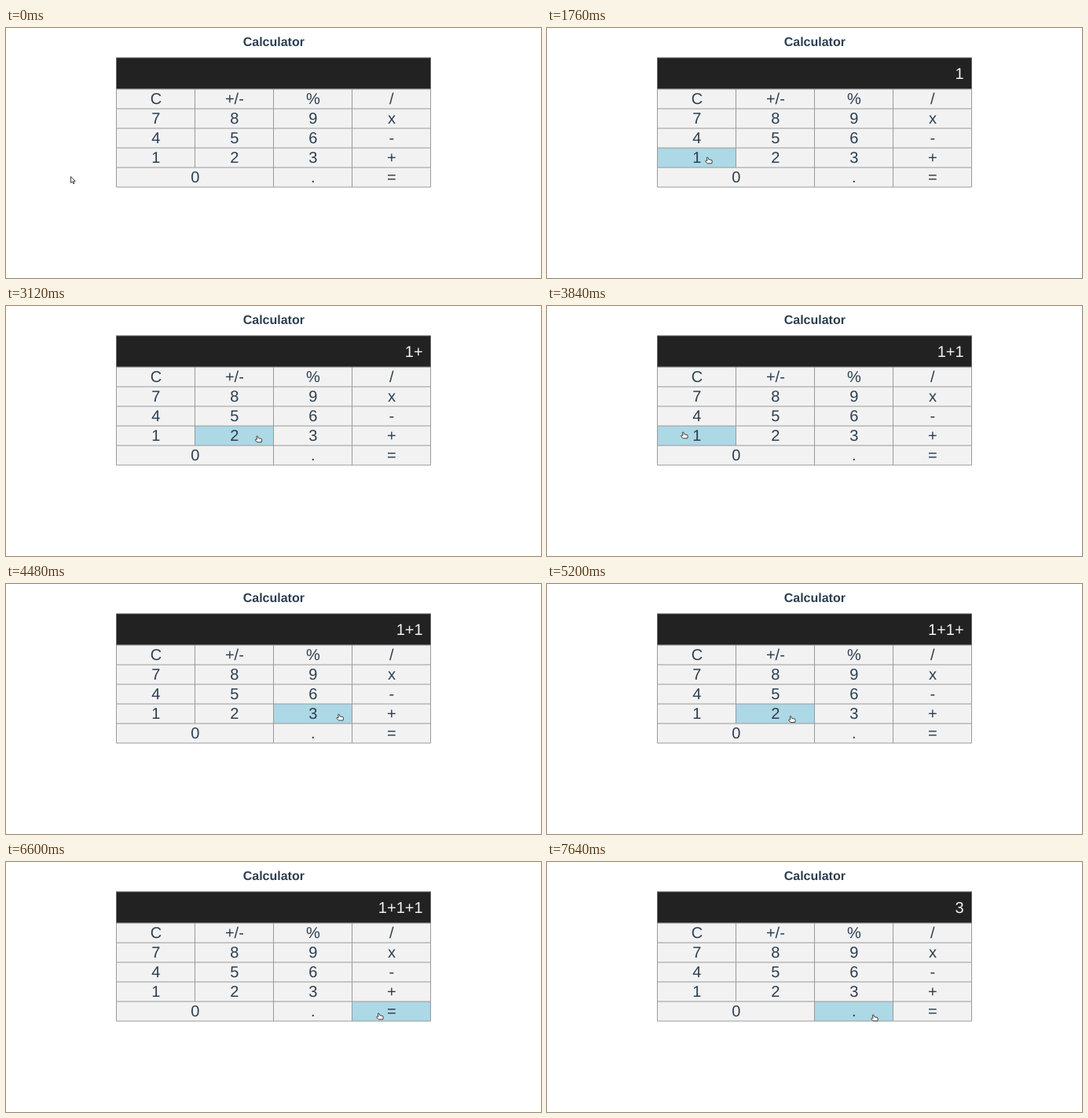
An HTML page for the animation above (8 s loop, 681 by 319 pixels).

```html
<!DOCTYPE html>
<html lang="en">
<head>
<meta charset="utf-8">
<title>Calculator</title>
<style>
html, body { margin: 0; width: 100%; height: 100%; overflow: hidden; background: #fff; }
svg { display: block; width: 681px; height: 319px; }
text { font: 20px "Liberation Sans", Arial, sans-serif; fill: #2c3e50; text-anchor: middle; text-rendering: geometricPrecision; }
.title { font-size: 16px; font-weight: bold; }
.screen { fill: #222; stroke: #666; }
.readout { fill: #f2f2f2; text-anchor: end; }
.cell { fill: #f2f2f2; }
.cell.hover { fill: #add8e6; }
.lines { fill: none; stroke: #999; }
.pointer { fill: #fff; stroke: #222; stroke-width: .85; stroke-linejoin: round; }
</style>
</head>
<body>
<svg viewBox="0 0 681 319">
  <text class="title" x="340.8" y="23">Calculator</text>
  <rect class="screen" x="140.5" y="38" width="400" height="40"/>
  <text class="readout" id="readout" x="530.6" y="65"></text>
  <g id="cells"></g>
  <path class="lines" d="M140.5 78h400v125h-400ZM140.5 103h400m-400 25h400m-400 25h400m-400 25h400M240.5 78v100M340.5 78v125M440.5 78v125"/>
  <g id="labels"></g>
  <path class="pointer" id="arrow" d="M.5.6V8.7L2.4 7 3.7 9.8 4.9 9.3 3.7 6.5H6.3Z"/>
  <path class="pointer" id="hand" d="M3 5.2 2.4 1.7Q2.6.5 3.7 1.1L4.9 3.8 8 4.3Q9.4 4.6 9.2 6L8.8 8.8H3.4L.9 6.6Q.3 5.4 1.4 5.2Z"/>
</svg>
<script>
const LOOP = 8000, STEP = 40;
const LEFT = 140.5, TOP = 78, COL = 100, ROW = 25;
const $ = id => document.getElementById(id);

function add(parent, tag, attrs, label = '') {
  const el = document.createElementNS('http://www.w3.org/2000/svg', tag);
  for (const name in attrs) el.setAttribute(name, attrs[name]);
  el.textContent = label;
  parent.append(el);
  return el;
}

const cells = [];
['C +/- % /', '7 8 9 x', '4 5 6 -', '1 2 3 +', '0 . ='].forEach((row, r) => {
  let x = LEFT;
  const y = TOP + r * ROW;
  for (const key of row.split(' ')) {
    const w = key === '0' ? 2 * COL : COL;
    const el = add($('cells'), 'rect', { class: 'cell', x, y, width: w, height: ROW });
    add($('labels'), 'text', { x: x + w / 2 + .4, y: y + 18.8 }, key);
    cells.push({ el, x, y, w });
    x += w;
  }
});

const clicks = [
  { at: 1600, shows: '1' }, { at: 2840, shows: '1+' }, { at: 3840, shows: '1+1' },
  { at: 4880, shows: '1+1+' }, { at: 5840, shows: '1+1+1' }, { at: 6920, shows: '3' }
];

// Each move glides to a key, bowing downwards by sag on the way.
const home = { x: 82, y: 189 };
const moves = [
  { from: 680, to: 1440, x: 201, y: 164, sag: -4 },
  { from: 1760, to: 2320, x: 469, y: 160, sag: 9 },
  { from: 3000, to: 3400, x: 170, y: 160, sag: 5 },
  { from: 4120, to: 4720, x: 468, y: 163, sag: 5 },
  { from: 5040, to: 5520, x: 178, y: 168, sag: 2 },
  { from: 5840, to: 6600, x: 471, y: 192, sag: -8 },
  { from: 7240, to: 7400, x: 447, y: 192, sag: 0 },
  { from: 7520, to: 7640, x: 412, y: 194, sag: 0 }
];
const easeOut = k => 1 - (1 - k) ** 2;

function pointerAt(t) {
  let { x, y } = home;
  for (const m of moves) {
    if (t < m.from) break;
    const k = easeOut(Math.min(1, (t - m.from) / (m.to - m.from)));
    x += (m.x - x) * k;
    y += (m.y - y) * k + m.sag * 4 * k * (1 - k);
  }
  return { x, y };
}

function draw(now) {
  const t = Math.floor(now % LOOP / STEP) * STEP;
  const { x, y } = pointerAt(t);
  const tipX = x + 3, tipY = y + .5;
  let over = false;
  for (const c of cells) {
    const hit = tipX >= c.x && tipX < c.x + c.w && tipY >= c.y && tipY < c.y + ROW;
    c.el.classList.toggle('hover', hit);
    over = over || hit;
  }
  for (const [id, shown] of [['arrow', !over], ['hand', over]]) {
    $(id).setAttribute('transform', `translate(${x} ${y})`);
    $(id).style.display = shown ? '' : 'none';
  }
  $('readout').textContent = clicks.filter(c => c.at <= t).pop()?.shows ?? '';
}

let start;
function tick(now) {
  start ??= now;
  draw(now - start);
  requestAnimationFrame(tick);
}
draw(0);
requestAnimationFrame(tick);
</script>
</body>
</html>
```
